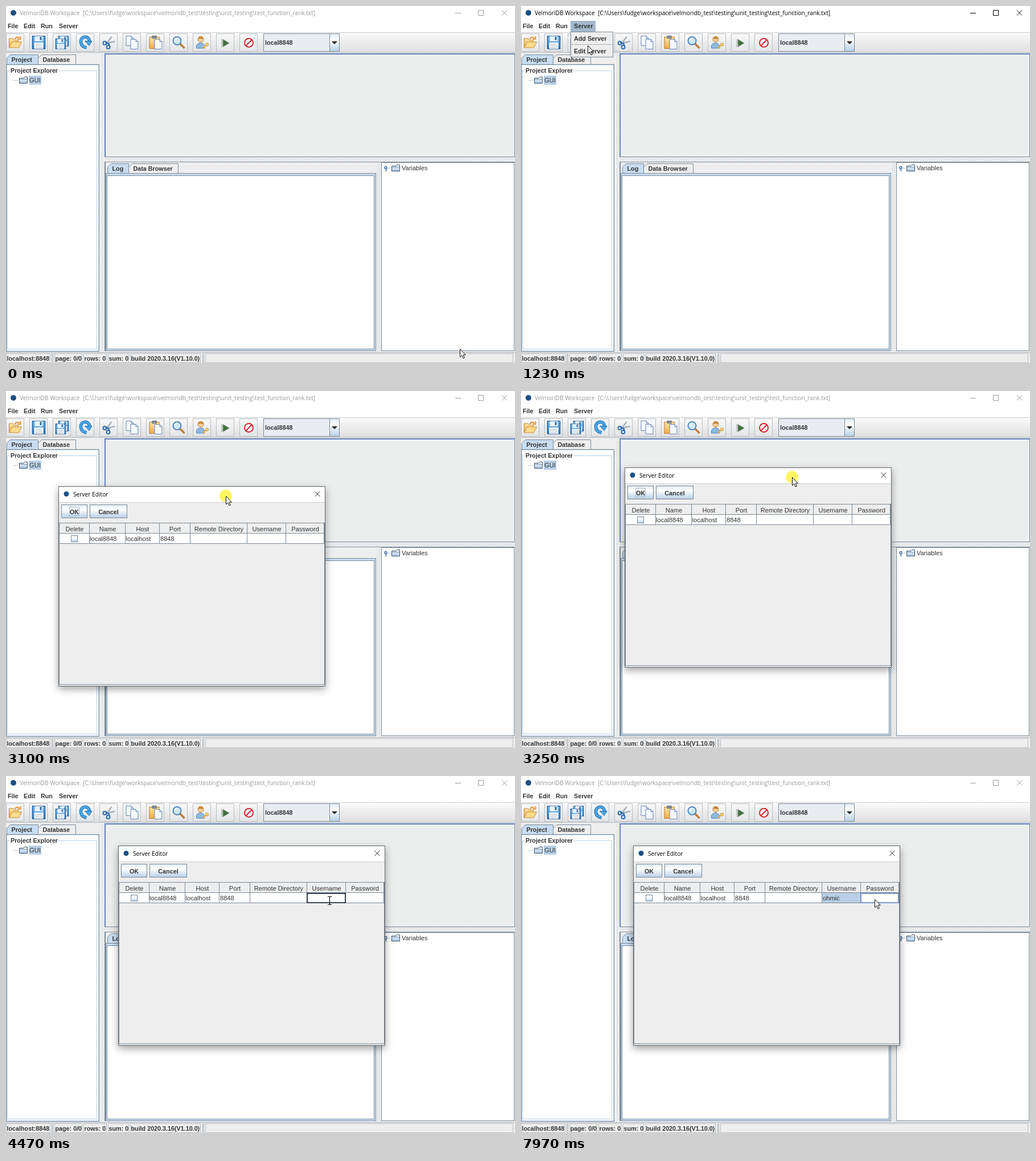
An HTML page that plays this animation: 894x626 px, repeating every 8 s.

```html
<!DOCTYPE html>
<html lang="en">
<head>
<meta charset="utf-8">
<title>Server editor</title>
<style>
  html, body { margin: 0; width: 100%; height: 100%; overflow: hidden; background: #eee; }
  svg { display: block; }
  text { font: 11.1px "Liberation Sans", Arial, sans-serif; fill: #333; }
  .bold { font-weight: bold; font-size: 10.75px; }
  .caption { font: 10.2px "Open Sans", "Noto Sans", sans-serif; fill: #000; }
  .middle { text-anchor: middle; }
  #caption { fill: #999; stroke: #999; }
  #caption text { fill: inherit; stroke: none; }
  #caption.active { fill: #000; stroke: #000; }
  #shadow { filter: drop-shadow(0 5px 7px rgba(0, 0, 0, .36)); }
</style>
</head>
<body>
<svg id="stage" width="894" height="626" viewBox="0 0 894 626">
  <defs>
    <linearGradient id="bar" x2="0" y2="1"><stop stop-color="#fafafa"/><stop offset="1" stop-color="#dedede"/></linearGradient>
    <linearGradient id="face" x2="0" y2="1"><stop stop-color="#e2ebf4"/><stop offset=".35" stop-color="#fff"/><stop offset="1" stop-color="#b8cfe5"/></linearGradient>
    <linearGradient id="tool" x2="0" y2="1"><stop stop-color="#f8f8f8"/><stop offset="1" stop-color="#e3e5e7"/></linearGradient>
    <linearGradient id="folder" x2="0" y2="1"><stop stop-color="#fff"/><stop offset="1" stop-color="#a9c4e2"/></linearGradient>
    <linearGradient id="blue" x2="0" y2="1"><stop stop-color="#7cc0ee"/><stop offset="1" stop-color="#2f7cc0"/></linearGradient>
    <linearGradient id="gold" x2="0" y2="1"><stop stop-color="#ffe6a0"/><stop offset="1" stop-color="#f0ac48"/></linearGradient>
    <pattern id="bumps" width="4" height="4" patternUnits="userSpaceOnUse">
      <rect width="4" height="4" fill="#eee"/>
      <path d="M0 0h1v1H0zM2 2h1v1H2z" fill="#a3b1c0"/><path d="M1 1h1v1H1zM3 3h1v1H3z" fill="#fff"/>
    </pattern>
  </defs>
</svg>
<script>
const LOOP = 8000, EDGE = '#7a8a99', ACCENT = '#6382bf', PALE = '#b8cfe5', TAB = '#c8ddf2';

// Markup helpers: boxes and lines sit on pixel centres, labels are placed by their vertical middle.
const box = (x, y, w, h, fill, stroke = 'none', extra = '') => {
  const inset = stroke === 'none' ? 0 : .5;
  return `<rect x="${x + inset}" y="${y + inset}" width="${w - 2 * inset}" height="${h - 2 * inset}" fill="${fill}" stroke="${stroke}" ${extra}/>`;
};
const shape = (d, fill = 'none', stroke = 'none', width = 1) =>
  `<path d="${d}" fill="${fill}" stroke="${stroke}" stroke-width="${width}"/>`;
const label = (x, cy, text, cls = '') => `<text x="${x}" y="${cy + 4}" class="${cls}">${text}</text>`;
const bold = (x, cy, text) => label(x, cy, text, 'bold');
const group = (id, content) => `<g id="${id}">${content}</g>`;
const at = (x, y, content, scale = 1) => `<g transform="translate(${x} ${y}) scale(${scale})">${content}</g>`;

const tab = (x, y, w, h, text, selected) =>
  shape(`M${x + .5} ${y + h}V${y + 6.5}L${x + 6.5} ${y + .5}H${x + w + .5}V${y + h}`, selected ? TAB : '#eee', EDGE) +
  bold(x + 8.5, y + h / 2, text);
const folder = (x, y) => at(x, y,
  shape('M.5 11.5V2.5H8L9.5.5H14.5V11.5Z', 'url(#folder)', '#39536f') + shape('M1 4.5H14', 'none', '#7a92ad'));
const floppy = (x, y, size) => at(x, y,
  shape('M1 1H23V23H1Z', 'url(#blue)', '#1f5c9c', 1.5) + box(5, 1, 14, 9, '#e9f3fc') + box(14, 2, 3, 6, '#3c6f9e') +
  box(4, 12, 16, 11, '#fff') + shape('M6 15H18M6 18H18M6 21H18', 'none', '#9ab0c6'), size / 24);
const page = (x, y) => shape(`M${x} ${y}h9l4 4v13h-13z`, '#f4f9ff', '#6685b5') +
  shape(`M${x + 9} ${y}v4h4`, '#cfe0f5', '#6685b5');

const refreshArc = 'M14 21Q4 19 4 10.5A7.5 7.5 0 0 1 19 9';
const icons = [
  shape('M1 21V5H8L10 8H17V11', 'url(#gold)', '#c78a32') + shape('M1 21L6 11H23L18 21Z', '#ffdc8c', '#c78a32') +
    shape('M11 6Q14 1 19 4M21 1V6H16', 'none', '#e8973a', 2),
  floppy(0, 0, 24),
  floppy(5, 0, 19) + floppy(0, 5, 19),
  shape(refreshArc, 'none', '#1c6bb0', 5.5) + shape('M11 9.5H23.5L18.5 17.5Z', '#4ba6e6', '#1c6bb0') +
    shape(refreshArc, 'none', '#4ba6e6', 3.5),
  shape('M8 14L17 2M9 13L23 10', 'none', '#a5b1bd', 2.5) + shape('M6 12L12 14L13 18', 'none', '#245b9c', 2) +
    '<g fill="none" stroke="#2b6cb2" stroke-width="2"><circle cx="5" cy="13" r="3"/><circle cx="11" cy="20" r="3"/></g>',
  page(1.5, .5) + page(9.5, 6.5),
  box(1, 2, 18, 21, 'url(#gold)', '#b87728') + box(6, 0, 8, 5, '#8696a6', '#596979') + page(10.5, 6.5),
  shape('M14 14L22 22', 'none', '#c07c3c', 3.5) +
    '<circle cx="9" cy="9" r="7" fill="#cfe8fa" stroke="#5489bd" stroke-width="2"/>' + shape('M5 9Q5 5 9 5', 'none', '#fff', 2),
  shape('M2 22V18Q3 13 9 13T16 18V22Z', '#8ebbe2', '#4d82b4') + '<circle cx="9.5" cy="6.5" r="5" fill="#f8cf98" stroke="#b9813f"/>' +
    shape('M4.5 6Q5 1 9.5 1T14.5 6Q9 5 4.5 6', '#c98a3c') + shape('M13 21L20 16M15 20L17 22', 'none', '#e8a83a', 2) +
    '<circle cx="20.5" cy="15.5" r="2.5" fill="#ffdc84" stroke="#c58415"/>',
  shape('M7.5 6.5V19.5L18.5 13Z', '#3f6f3c', '#8b968a') + shape('M5.5 6V20', 'none', '#c3c8c1', 2),
  '<circle cx="12" cy="12.5" r="7.5" fill="#fff" stroke="#d9232e" stroke-width="2"/>' + shape('M7 17.5L17 7.5', 'none', '#d9232e', 2)
];

const caption = group('caption',
  label(24, 12, 'VelmoriDB Workspace', 'caption') +
  label(135, 12, '[C:\\Users\\fudge\\workspace\\velmoridb_test\\testing\\unit_testing\\test_function_rank.txt]', 'caption') +
  '<path d="M789 12.5H799M829.5 7.5H838.5V16.5H829.5ZM871 7.5L880 16.5M880 7.5L871 16.5" fill="none"/>');

const toolbar = box(0, 47, 894, 35, 'url(#bar)') + box(0, 46, 894, 1, '#ccc') + box(0, 81, 894, 1, '#b5bbc1') +
  icons.map((icon, i) => box(41 * i, 48, 32, 32, 'url(#tool)', '#b9bfc5') + at(4.5 + 41 * i, 52, icon)).join('') +
  box(452, 48, 134, 32, '#e9edf1', EDGE) + box(568, 48, 18, 32, 'url(#face)', EDGE) +
  shape('M572 62H582L577 67Z', '#222') + bold(455, 64, 'local8848');

const projectPane = tab(1, 85, 55, 18, 'Project', true) + tab(56, 85, 66, 18, 'Database') +
  box(0, 102, 164, 504, TAB, EDGE) + box(2, 104, 160, 500, '#fff') + box(2, 113, 158, 489, '#fff', PALE) +
  box(7, 106, 85, 14, '#fff') + bold(8, 113, 'Project Explorer') +
  shape('M12 130.5H21', 'none', PALE) + folder(23, 124) + box(40, 122, 22, 16, PALE) + label(41, 130, 'GUI');

const workPanes = box(167, 83, 5, 524, 'url(#bumps)') + box(174, 266, 720, 6, 'url(#bumps)') + box(652, 275, 5, 331, 'url(#bumps)') +
  box(173, 83, 721, 182, '#eceeee', EDGE) + shape('M173 84H893M174 83V264', 'none', ACCENT, 2) +
  shape('M173 273.5H894', 'none', EDGE) + shape('M174 273V605', 'none', EDGE, 2) +
  tab(178, 276, 37, 18, 'Log', true) + tab(215, 276, 87, 18, 'Data Browser') +
  box(175, 293, 475, 312, TAB, EDGE) + box(177, 297, 470, 305, '#fff', EDGE) +
  box(659, 274, 234, 331, '#fff', EDGE) + folder(677, 278) + label(695, 284, 'Variables') +
  '<circle cx="667" cy="283.5" r="2" fill="#fff" stroke="#39639c" stroke-width="1.4"/>' +
  shape('M667.5 286V290', 'none', '#39639c', 1.4) + shape('M670 284.5H675', 'none', PALE);

const statusBar = box(0, 606, 894, 20, '#eee') + shape('M0 607.5H894M80.5 609V626M82.5 609V626M345.5 609V626M347.5 609V626', 'none', '#a9b0b7') +
  [[0, 78, 'localhost:8848'], [85, 49, 'page: 0/0'], [136, 41, 'rows: 0'], [179, 37, 'sum: 0'], [218, 124, 'build 2020.3.16(V1.10.0)'], [350, 541, '']]
    .map(([x, w, text]) => box(x, 609, w, 17, '#eee', '#b8bdc2') + bold(x + 1.5, 618, text)).join('');

const menu = group('menu', box(87, 26, 44, 19, '#a3b8cc') + box(87, 45, 75, 45, '#eee', EDGE) +
  group('hover', box(88, 69, 73, 20, '#a3b8cc')) + shape('M88 67.5H161', 'none', '#a9b3bd') +
  bold(93, 57, 'Add Server') + bold(93, 79, 'Edit Server'));

const columns = [['Delete', 1], ['Name', 54], ['Host', 117], ['Port', 177], ['Remote Directory', 231], ['Username', 331], ['Password', 399], ['', 466]];
const header = columns.slice(0, -1).map(([name, x], i) => {
  const next = columns[i + 1][1];
  return label((x + next) / 2 + 1, 75, name, 'middle') + shape(`M${next + .5} 65V101`, 'none', EDGE);
}).join('');
const button = (x, w, text) => box(x, 32, w, 24, 'url(#face)', EDGE) + label(x + w / 2, 44.5, text, 'bold middle');

const dialog = group('dialog', box(0, 0, 469, 351, '#eee', '#666', 'id="shadow"') +
  box(1, 1, 467, 27, '#fff') + shape('M1 28.5H468', 'none', '#c9ced3') +
  '<circle cx="14" cy="13.5" r="4.5" fill="#1d4f82"/>' + label(26, 13.5, 'Server Editor', 'caption') +
  shape('M450.5 9L459.5 18M459.5 9L450.5 18', 'none', '#222') +
  button(5, 46, 'OK') + button(55, 66, 'Cancel') + box(19, 36, 18, 16, 'none', '#a3b8cc', 'id="focus"') +
  box(1, 64, 467, 284, '#eee', EDGE) + box(2, 83, 464, 17, '#fff') +
  box(332, 83, 67, 17, PALE, 'none', 'id="selected"') + header + shape('M2 82.5H466M2 100.5H466', 'none', EDGE) +
  box(22, 86, 12, 12, 'url(#face)', EDGE) +
  label(55, 92, 'local8848') + label(118.5, 92, 'localhost') + label(179, 92, '8848') +
  '<rect id="cell" y="83.8" height="16.4" fill="none" stroke-width="1.6"/><text id="typed" x="333" y="96"></text>');

const pointer = '<circle id="press" r="10.8" fill="#fff22e" opacity=".75"/>' +
  group('arrow', shape('M.5.5V14.7L3.7 11.7 6 17 8.3 16 6 10.8H10.3Z', '#fff', '#111')) +
  group('beam', shape('M-2 -5.5H.5L1.5-4.5 2.5-5.5H5M-2 8.5H.5L1.5 7.5 2.5 8.5H5M1.5-4.5V7.5', 'none', '#000', 1.1));

const stage = document.getElementById('stage');
stage.innerHTML += box(0, 0, 894, 626, '#eee') + box(0, 0, 894, 46, '#fff') +
  '<circle cx="13" cy="12" r="5" fill="#1d4f82"/>' + caption + toolbar + projectPane + workPanes + statusBar +
  menu + [[3, 'File'], [31, 'Edit'], [61, 'Run'], [93, 'Server']].map(([x, text]) => bold(x, 35, text)).join('') +
  dialog + group('pointer', pointer);

// Each move: first step, last step, number of steps, goal x, goal y, constant speed.
const moves = [
  [70, 760, 10, 106, 32],
  [1150, 1230, 2, 117, 69],
  [1400, 1480, 2, 117, 86],
  [1630, 2010, 6, -21, 86, true],
  [3100, 3100, 1, 386, 184],
  [3170, 3250, 2, 476, 151],
  [3330, 3330, 1, 491, 139],
  [3560, 3790, 4, 567, 234],
  [3870, 3870, 1, 567, 217],
  [7500, 7650, 3, 621, 216]
];
const presses = [[930, 1080], [1480, 1550], [3100, 3480], [4020, 4170], [4240, 4400], [7820, 7970]];
const keyTimes = [5480, 5630, 5710, 5880, 5950];
const userName = 'ohmic';

const during = (t, start, end) => t >= start && t < end;
const smooth = p => p * p * (3 - 2 * p);

function pointerAt(t) {
  let x = 797, y = 601;
  for (const [start, end, count, goalX, goalY, linear] of moves) {
    if (t < start) break;
    const step = (Math.floor((t - start) / (end - start) * (count - 1) + .1) || 0) + 1;
    const progress = Math.min(1, step / count), p = linear ? progress : smooth(progress);
    x += (goalX - x) * p;
    y += (goalY - y) * p;
  }
  return [Math.round(x), Math.round(y)];
}

const part = id => document.getElementById(id);
const show = (id, visible) => part(id).setAttribute('visibility', visible ? 'inherit' : 'hidden');
const place = (id, x, y) => part(id).setAttribute('transform', `translate(${x} ${y})`);

function render(t) {
  part('caption').classList.toggle('active', during(t, 930, 1550));
  show('menu', during(t, 1010, 1550));
  show('hover', during(t, 1400, 1550));

  place('pointer', ...pointerAt(t));
  show('press', presses.some(([start, end]) => during(t, start, end)));
  const beam = during(t, 4470, 6260);
  show('arrow', !beam);
  show('beam', beam);

  // The dialog hangs on the pointer until it is dropped.
  const [dragX, dragY] = pointerAt(Math.min(t, 3400));
  place('dialog', dragX - 294, dragY - 17);
  show('dialog', t >= 3100);
  show('focus', t < 4090);
  show('selected', during(t, 4090, 4320) || t >= 6260);

  const password = t >= 6260, cell = part('cell');
  show('cell', t >= 4090);
  cell.setAttribute('x', password ? 400 : 332);
  cell.setAttribute('width', password ? 66 : 67);
  cell.setAttribute('stroke', during(t, 4320, 6260) ? '#111c2c' : ACCENT);
  part('typed').textContent = userName.slice(0, keyTimes.filter(key => t >= key).length);
}

function frame(now) {
  render(now % LOOP);
  requestAnimationFrame(frame);
}
render(0);
requestAnimationFrame(frame);
</script>
</body>
</html>
```
